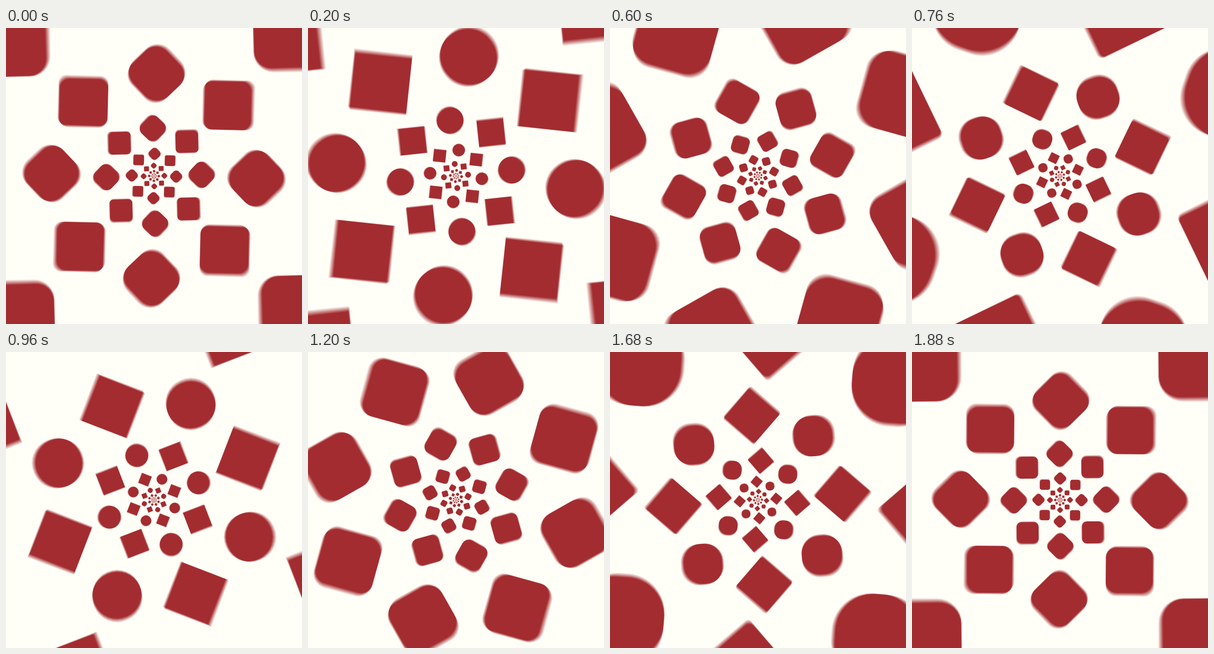
An HTML page with a canvas for the animation above (1.92 s loop, 500 px wide and 500 px high).

```html
<!DOCTYPE html>
<html lang="en">
<head>
<meta charset="utf-8">
<title>Rings of morphing squares</title>
<style>
  html, body { margin: 0; width: 100%; height: 100%; overflow: hidden; background: #fffff8; }
  canvas { display: block; width: 500px; height: 500px; }
</style>
</head>
<body>
<canvas width="500" height="500"></canvas>
<script>
const ctx = document.querySelector('canvas').getContext('2d');
const STEP = 40, STEPS = 48;    // ms per step, steps per loop
const SAMPLES = 15;             // motion blur samples per step
const BASE = 165, RATIO = 2.148; // ring radius and growth from ring to ring
const SIDE = 0.48;              // side of a square relative to its ring radius
const EIGHTH = Math.PI / 4;

// Adds every shape at loop phase p to the current path.
function traceRings(p) {
  const morph = Math.sin(3 * Math.PI * p);
  for (let k = -10; k <= 1; k++) {
    const r = BASE * RATIO ** (2 * p + k);
    const spin = k % 2 ? -p : p; // neighbouring rings turn opposite ways
    const side = SIDE * r;
    for (let j = 0; j < 8; j++) {
      const a = (j + spin) * EIGHTH;
      const round = side / 4 * (1 + (j % 2 ? -morph : morph));
      ctx.setTransform(1, 0, 0, 1, 250, 250);
      ctx.rotate(a);
      ctx.translate(r, 0);
      ctx.rotate(EIGHTH);
      ctx.roundRect(-side / 2, -side / 2, side, side, round);
    }
  }
  ctx.resetTransform();
}

function cover(mode, color) {
  ctx.globalCompositeOperation = mode;
  ctx.fillStyle = color;
  ctx.fillRect(0, 0, 500, 500);
}

function draw(step) {
  ctx.clearRect(0, 0, 500, 500);
  // Sum the samples as coverage, then colour the result.
  ctx.globalCompositeOperation = 'lighter';
  ctx.globalAlpha = 1 / SAMPLES;
  ctx.fillStyle = '#000';
  for (let s = 0; s < SAMPLES; s++) {
    ctx.beginPath();
    traceRings((step + 1 + (s + 0.5) / SAMPLES) / STEPS);
    ctx.fill();
  }
  ctx.globalAlpha = 1;
  cover('source-in', '#a32c30');
  cover('destination-over', '#fffff8');
}

const start = performance.now();
let shown = -1;
function tick() {
  const step = Math.floor((performance.now() - start) / STEP) % STEPS;
  if (step !== shown) draw(shown = step);
  requestAnimationFrame(tick);
}
tick();
</script>
</body>
</html>
```
